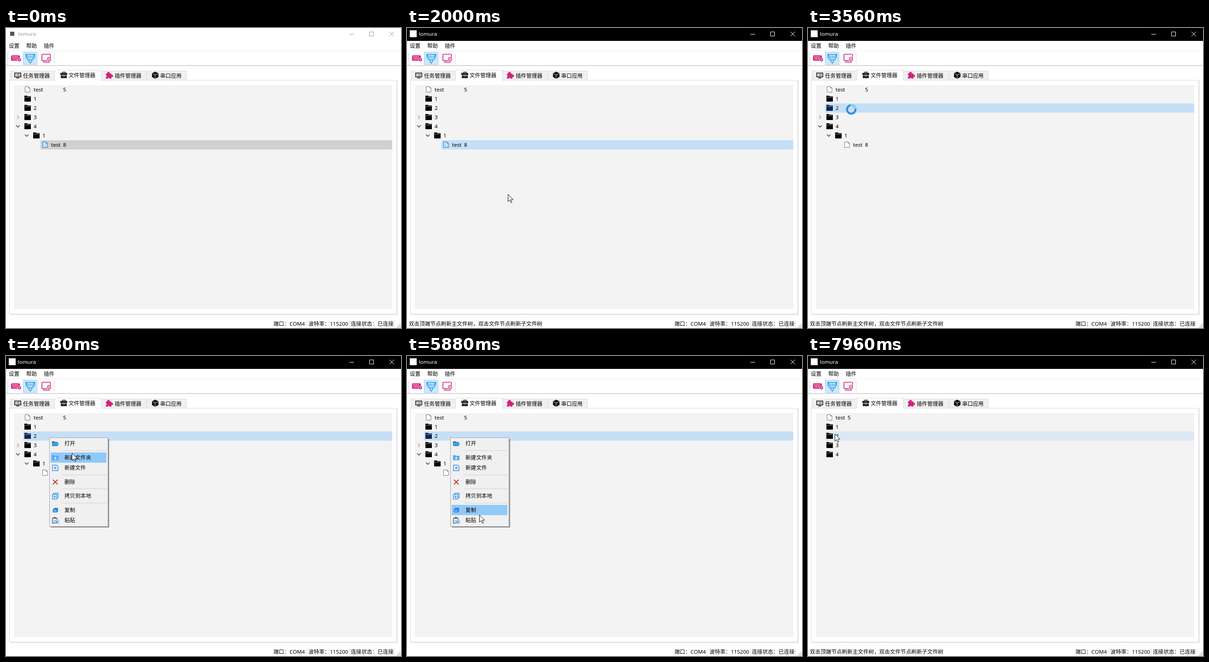
An HTML page for the animation above (8000 ms loop, 858x652 px).

```html
<!DOCTYPE html>
<html lang="zh-CN">
<head>
<meta charset="utf-8">
<style>
  html, body { margin: 0; width: 858px; height: 652px; overflow: hidden; background: #fff; }
  svg { display: block; }
  text { font: 11.6px "Noto Sans", "Noto Sans CJK SC", "Noto Sans CJK", sans-serif; white-space: pre; }
</style>
</head>
<body>
<svg id="stage" width="858" height="652" viewBox="0 0 858 652"></svg>
<script>
const LOOP = 8000;
const PINK = '#d4217c', BLUE = '#2a96dc', SKY = '#2f8df0';
const SELECTED = '#c5dff7', HOVER = '#dce9f4', INACTIVE = '#d0d0d0';

const rect = (x, y, w, h, fill, more = '') =>
  `<rect x="${x}" y="${y}" width="${w}" height="${h}" fill="${fill}" ${more}/>`;
const frame = (x, y, w, h, fill, stroke) =>
  rect(x + .5, y + .5, w - 1, h - 1, fill, `stroke="${stroke}"`);
const fillPath = (d, fill) => `<path d="${d}" fill="${fill}"/>`;
const line = (d, stroke, width = 1) =>
  `<path d="${d}" fill="none" stroke="${stroke}" stroke-width="${width}"/>`;
const label = (x, y, s, fill = '#000') => `<text x="${x}" y="${y}" fill="${fill}">${s}</text>`;
const dot = (x, y, r, fill) => `<circle cx="${x}" cy="${y}" r="${r}" fill="${fill}"/>`;
const at = (x, y, body, more = '') => `<g transform="translate(${x} ${y})" ${more}>${body}</g>`;
const range = n => [...Array(n).keys()];

// ---- window chrome ----

function toolbar() {
  const grip = range(7).map(i => rect(3, 54 + i * 4, 1.5, 1.5, '#a8a8a8')).join('');
  const keys = range(8).map(i =>
    rect(13.5 + i % 4 * 3.4 + (i > 3 ? 1 : 0), i > 3 ? 66.3 : 62, 2, 2, '#fff')).join('');
  const keyboard = rect(11, 59.5, 19, 11.5, PINK, 'rx="1.5"') + keys +
    dot(29.3, 69, 4.2, '#fff') + dot(29.3, 69, 3.4, PINK) + dot(29.3, 69, 1.2, '#fff');
  const port =
    line('M45 57.5H60.5L59 69H46.5ZM50 69V73Q50 74.5 52.7 74.5T55.5 73V69M52.7 74V78', BLUE, 1.5) +
    line('M43.3 56V66M62.2 56V66M42 58H45M60.5 58H64M49 60V66M52.7 60V66M56.5 60V66', BLUE, 1.4);
  const monitor = line('M89 71.2H79.5Q78 71.2 78 69.7V58.5Q78 57 79.5 57H95Q96.5 57 96.5 58.5V63', PINK, 1.7) +
    line('M80 74.3H95', PINK, 1.6) +
    line('M90.3 65.3L93.5 63.6L96.7 65.3V70.2L93.5 72L90.3 70.2Z', PINK, 1.5) + dot(93.5, 67.8, 1.3, PINK);
  return rect(0, 49, 858, 1, '#ededed') + rect(0, 81, 858, 1.2, '#bcbcbc') + grip + keyboard +
    frame(37, 52, 31, 28, '#cce8ff', '#99d1ff') + port +
    rect(70, 54, 1, 24, '#e0e0e0') + monitor + rect(104, 54, 1, 24, '#d5d5d5');
}

function tabs() {
  const idle = [[8, 98], [207, 99], [305, 87]]
    .map(([x, w]) => frame(x, 93, w, 21, '#f0f0f0', '#d9d9d9')).join('');
  const screen = line('M18.8 97.7H32.2V106.3H18.8ZM22 108.6H29', '#111', 1.5) +
    line('M21 100.5H22.5M24 100.5H30M21 103.5H22.5M24 103.5H30', '#111', 1.2);
  const briefcase = line('M123 97.5V95.8H128.5V97.5', '#222', 1.5) +
    rect(118, 97.5, 15, 5, '#222', 'rx="1"') + rect(119, 103.5, 13, 5.5, '#222') +
    rect(123.8, 101.5, 3.5, 3.5, '#fff') + rect(124.5, 102, 2, 2.2, '#222');
  const puzzle = rect(217, 99, 12, 11, PINK, 'rx="1"') + dot(222.6, 98, 2.7, PINK) +
    dot(230, 104, 2.6, PINK) + dot(217, 104.5, 1.8, '#f0f0f0') + dot(223, 110, 1.8, '#f0f0f0');
  const cube = fillPath('M324 95L331.3 98.3V106.5L324 110.4L317 106.5V98.3Z', '#111') +
    line('M317.5 98.8L324 102L331 98.8M324 102V110', '#f0f0f0', .9);
  return rect(849, 114, 2, 509, '#ececec') + rect(8, 622, 843, 1.5, '#e6e6e6') +
    frame(7, 113, 842, 509, '#fff', '#dadada') + idle +
    frame(105, 91, 103, 24, '#fff', '#d9d9d9') + rect(106, 113, 101, 3, '#fff') +
    screen + label(37, 108, '任务管理器') + briefcase + label(136, 107, '文件管理器') +
    puzzle + label(236, 108, '插件管理器') + cube + label(335, 108, '串口应用') +
    rect(17, 124, 822, 487, '#f3f3f3');
}

function statusBar() {
  const bars = [653, 745, 843].map(x => rect(x, 635, 1, 16, '#dcdcdc')).join('');
  const grip = [[2, 0], [1, 1], [2, 1], [0, 2], [1, 2], [2, 2]]
    .map(([i, j]) => rect(849 + i * 3, 643 + j * 3, 2, 2, '#b5b5b5')).join('');
  return bars + grip + label(581, 647, '端口：COM4') + label(657, 647, '波特率：115200') +
    label(749, 647, '连接状态：已连接');
}

const chrome = rect(0, 0, 858, 652, '#fff') + label(6, 43, '设置') + label(44, 43, '帮助') +
  label(82, 43, '插件') + toolbar() + tabs() + statusBar();

function titleBar(active) {
  const ink = active ? '#fff' : '#999';
  const logo = active ? rect(6, 5, 15, 15, '#fff') : rect(9, 8, 9, 9, '#555');
  return rect(0, 0, 858, 28, active ? '#000' : '#fff') + logo + label(26, 17, 'lomura', ink) +
    line('M746 13.5H756M789.5 8.5H798.5V17.5H789.5ZM833 8L843 18M843 8L833 18', ink);
}

// ---- file tree ----

const TREE = [
  { name: 'test', size: 5, level: 0 },
  { name: '1', level: 0 }, { name: '2', level: 0 },
  { name: '3', level: 0, arrow: 'closed' }, { name: '4', level: 0, arrow: 'open' },
  { name: '1', level: 1, arrow: 'open' }, { name: 'test', size: 8, level: 2 }
];
const FRESH = TREE.slice(0, 5).map(r => ({ ...r, arrow: '' }));
const rowTop = i => 124 + i * 20;

const folder = (x, y, fill) =>
  fillPath(`M${x} ${y}h5.5l1.5 1.5h7v11.5h-14z`, fill) + rect(x + 1, y + 3.2, 12, .9, '#aaa');
const sheet = (x, y, fill, stroke) =>
  `<path d="M${x + .5} ${y + .5}h7.5l3 3v9h-10.5zm7.5 0v3h3" fill="${fill}" stroke="${stroke}"/>`;

function treeRow(row, i, s) {
  const y = rowTop(i), x = 40 + row.level * 19, picked = i === s.selected;
  let out = '';
  if (picked || i === s.hover) {
    const fill = !picked ? HOVER : s.active || i === s.hover ? SELECTED : INACTIVE;
    out += rect(x - 3, y, 839 - x + 3, 20, fill);
  }
  if (row.arrow === 'closed') out += line(`M${x - 16} ${y + 6}l4 4l-4 4`, '#999', 1.2);
  if (row.arrow === 'open') out += line(`M${x - 18} ${y + 7.5}l4 4l4-4`, '#333', 1.3);
  out += row.size
    ? sheet(x + 1, y + 3, picked ? '#bfe0fb' : '#fff', picked ? '#2b72b8' : '#777')
    : folder(x, y + 3, picked ? '#0e2350' : '#000');
  out += label(x + 20, y + 14, row.name);
  if (row.size) out += label(s.sizeX, y + 14, row.size);
  return out;
}

// ---- context menu ----

const plus = (x, y, c) => line(`M${x - 3} ${y}h6M${x} ${y - 3}v6`, c, 1.4);
const ICONS = {
  打开: fillPath('M-7-5h5l1.5 1.5h6v2h-10l-2.5 6z', '#1673b5') + fillPath('M-4-1h12l-3 6.5h-12z', '#2ba0dd'),
  新建文件夹: fillPath('M-7-5.5h5l1.5 1.5h7.5v9.5h-14z', '#57a8f8') + plus(0, 1, '#fff'),
  新建文件: line('M-6-6h9l3 3v9h-12z', SKY, 1.4) + plus(0, 0, SKY),
  删除: line('M-5-5L5 5M5-5L-5 5', '#c43010', 2),
  拷贝到本地: line('M-3.5-3.5V-6.3H6.3V3.5H3.5M-6.3-3.5H3.5V6.3H-6.3Z', SKY, 1.4) + plus(-1.4, 1.4, SKY),
  复制: rect(-3, -5, 9, 9, '#2776d0', 'rx="1.5"') + rect(-5.5, -3, 10, 8, SKY, 'rx="1.5"') +
    line('M-3.5 0H2.5M-3.5 2.5H2.5', '#bfe0ff', .9),
  粘贴: line('M-1 6H-6V-5H4V-1', '#444', 1.3) + rect(-3.5, -7, 5, 3, '#444') +
    rect(-2, 0, 9, 6, '#fff', `stroke="${SKY}"`) + rect(0, 2, 5, 3, SKY)
};
const FILE_MENU = ['打开', '', '删除', '', '拷贝到本地', '', '复制'];
const DIR_MENU = ['打开', '', '新建文件夹', '新建文件', '', '删除', '', '拷贝到本地', '', '复制', '粘贴'];
const ITEM = 22.2, GAP = 8.4;

function menu({ x, y, items, alpha }, [cx, cy]) {
  let top = 2, body = '';
  for (const name of items) {
    if (!name) {
      body += rect(29, Math.round(top + 3.6), 95, 1, '#d0d0d0');
      top += GAP;
      continue;
    }
    const hot = cx > x + 2 && cy >= y + top && cy < y + top + ITEM;
    if (hot) body += rect(3, top, 121, ITEM, '#91c9f7');
    body += at(13, top + 11.5, ICONS[name]) + label(33, top + 15.3, name);
    top += ITEM;
  }
  const h = Math.round(top + 3);
  return at(x, y, rect(4, 4, 126.5, h - 2, '#000', 'opacity=".22"') + rect(3, 3, 126, h - 2, '#000', 'opacity=".4"') +
    frame(0, 0, 128, h, '#f0f0f0', '#a6a6a6') + body, `opacity="${alpha}"`);
}

// ---- pointer ----

// start, end, steps, x, y: the pointer jumps in equal steps to its new place
const MOVES = [
  [150, 690, 8, 177, 254], [1230, 1610, 6, 219, 361],
  [2250, 2710, 7, 94, 177], [4100, 4480, 6, 143, 211],
  [4557, 4870, 5, 156, 305], [4950, 5250, 5, 160, 349],
  [5880, 5880, 1, 157, 345], [6200, 6270, 2, 156, 351],
  [7040, 7120, 2, 145, 339], [7195, 7660, 7, 64, 148], [7890, 7960, 2, 58, 169]
];

function pointerAt(t) {
  let p = [750, 637];
  for (const [t0, t1, n, x, y] of MOVES) {
    if (t < t0) break;
    const step = n === 1 ? 1 : Math.min(n, 1 + Math.floor((t - t0) / (t1 - t0) * (n - 1) + 1e-6));
    p = [p[0] + (x - p[0]) * step / n, p[1] + (y - p[1]) * step / n].map(Math.round);
  }
  return p;
}

const arrow = `<path d="M.5 .5V16.2L4.2 12.8L6.7 18.5L9 17.5L6.6 11.9H11.6Z" fill="#fff" stroke="#111"/>`;

function busyRing(t) {
  const turn = Math.floor((t - 3010) / 77) * 50;
  return dot(0, 0, 9.2, 'none" stroke="#2a8fd8" stroke-width="4') +
    `<path d="M0-9.2A9.2 9.2 0 0 1 9.2 0" fill="none" stroke="#9bdcf8" stroke-width="3" transform="rotate(${turn})"/>`;
}

// ---- timeline ----

const MENUS = [
  { x: 177, y: 254, items: FILE_MENU, from: 920, to: 2000 },
  { x: 94, y: 177, items: DIR_MENU, from: 3790, to: 6580 }
];
const FADE = 75;

function scene(t) {
  const p = pointerAt(t), busy = t >= 3010 && t < 3790;
  const open = MENUS.find(m => t >= m.from && t < m.to);
  const rows = t < 7040 ? TREE : t < 7270 ? [] : FRESH;
  const s = {
    active: t >= 840,
    selected: t < 3010 ? 6 : t < 7040 ? 2 : -1,
    hover: t < 150 || open || p[0] < 37 ? -1 : Math.floor((p[1] - 124) / 20),
    sizeX: t < 7040 ? 124 : 86
  };
  let out = titleBar(s.active) + rows.map((r, i) => treeRow(r, i, s)).join('');
  if (t >= 227 && !open) out += label(4, 647, '双击顶端节点刷新主文件树，双击文件节点刷新子文件树');
  if (open) {
    const fading = t < open.from + FADE || t >= open.to - FADE;
    out += menu({ ...open, alpha: fading ? .5 : 1 }, p);
  }
  if (t >= 150) out += at(...p, busy ? busyRing(t) : arrow);
  return out;
}

const stage = document.getElementById('stage');
stage.innerHTML = chrome + '<g id="live"></g>';
const live = document.getElementById('live');
const start = performance.now();
let shown = '';

function draw() {
  const next = scene((performance.now() - start) % LOOP);
  if (next !== shown) live.innerHTML = shown = next;
  requestAnimationFrame(draw);
}
draw();
</script>
</body>
</html>
```
